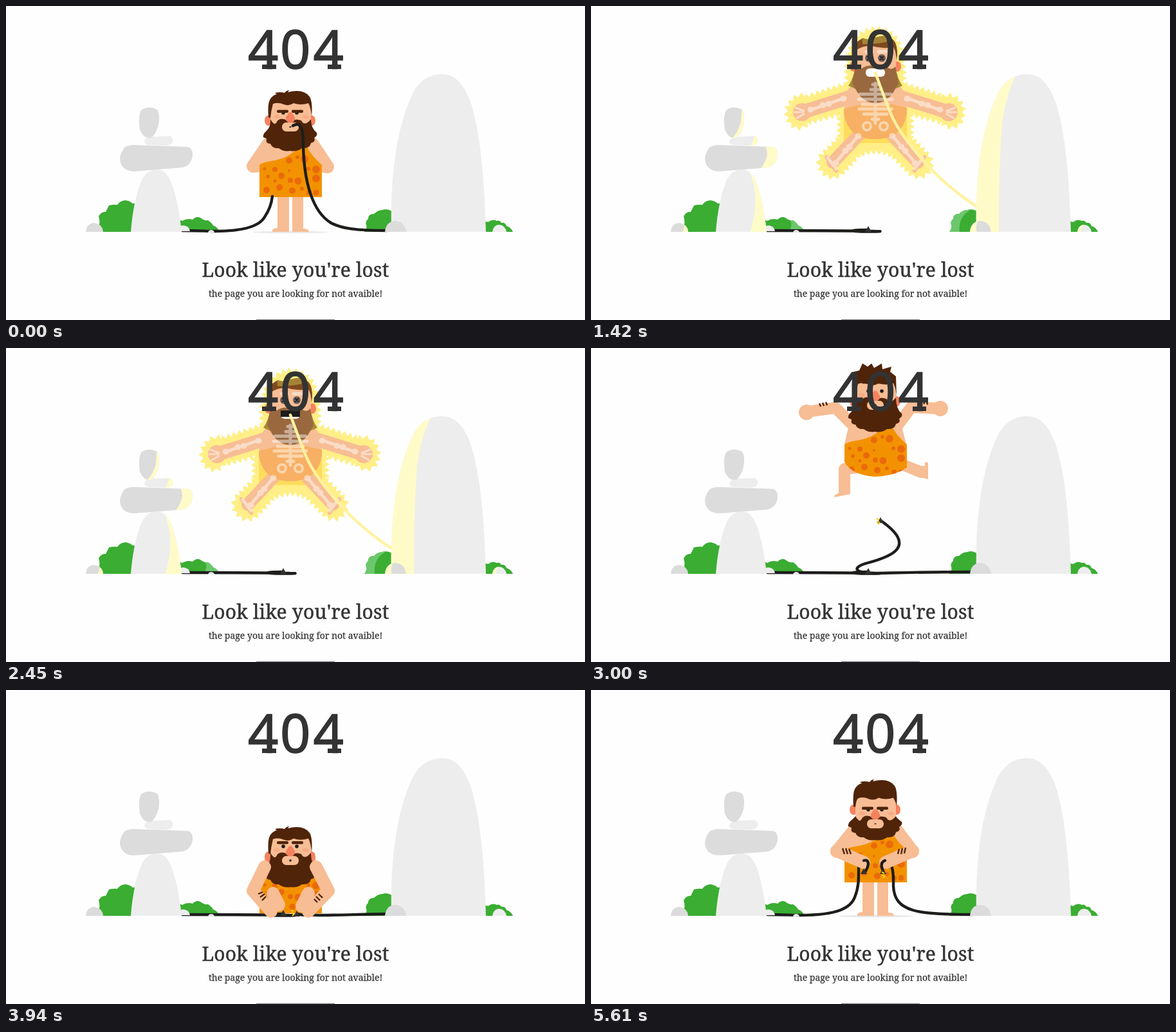
An HTML page that plays this animation: 900 by 488 pixels, repeating every 5.72 s.

```html
<!DOCTYPE html>
<html lang="en">
<head>
<meta charset="utf-8">
<title>404</title>
<style>
html, body { margin: 0; width: 100%; height: 100%; overflow: hidden; background: #fefefe; }
svg { display: block; }
text { fill: #333; stroke: #333; stroke-width: .25; font-family: "Noto Serif", serif; text-anchor: middle; }
#code { font: 500 83px "Noto Sans", sans-serif; text-anchor: start; stroke-width: 1.4; }
#title { font-size: 30px; letter-spacing: .2px; stroke-width: .5; }
.skin { fill: #f7bd94; }
.limb { fill: none; stroke: #f7bd94; stroke-width: 20; stroke-linecap: round; stroke-linejoin: round; }
.hair { fill: #4f2409; }
.fuzz { fill: none; stroke: #4f2409; stroke-width: 2.4; }
.coral { fill: #f5825f; }
.cable { fill: none; stroke: #1d1d1b; stroke-width: 4.4; stroke-linecap: round; }
.spark { fill: none; stroke: #f9d31c; stroke-width: 2; }
.bone { fill: none; stroke: #fff; stroke-width: 5; stroke-linecap: round; }
</style>
</head>
<body>
<svg width="900" height="488" viewBox="0 0 900 488">
  <defs>
    <g id="torso">
      <path class="skin" d="M404 204H479L491 250V258H394V246Z"/>
      <path fill="#f39200" d="M394 247Q398 243 412 241Q440 237 455 219H468Q474 232 491 247V297H394Z"/>
      <g id="spots" fill="#ea6a0b"></g>
    </g>
    <clipPath id="round"><path d="M380 200H510V262Q490 296 440 297Q405 294 394 274L380 272Z"/></clipPath>
    <path id="plug" d="M-5 4L0 -5L5 4Z" fill="#333"/>
    <path id="rays" class="spark" d="M-6 -3L-2 -1M-6 2H-2M-4 6L-1 3"/>
    <g id="halfShock">
      <path class="limb" style="stroke-width:22" d="M402 142L328 165"/>
      <circle class="skin" cx="328" cy="165" r="14"/>
      <path class="limb" d="M424 192L376 243"/>
      <path class="limb" style="stroke-width:6" d="M366 235L381 256"/>
      <ellipse class="coral" cx="408" cy="94" rx="6" ry="8"/>
    </g>
    <g id="halfBones">
      <path class="bone" d="M394 143L368 152M360 155L340 162M416 201L401 219M395 226L379 245M368 236L381 253"/>
      <path class="bone" style="stroke-width:9" d="M392 144h1M369 152h1M360 154h1M341 161h1M415 202h1M401 219h1M395 225h1M380 244h1"/>
      <path class="bone" style="stroke-width:3" d="M331 163L318 158M330 165H316M331 168L320 174"/>
      <circle class="bone" style="stroke-width:4" cx="429" cy="187" r="6"/>
    </g>
  </defs>

  <g id="bushes"></g>
  <ellipse id="shadow" cx="442" cy="351.5" rx="58" ry="1.8" fill="#e8e8e8"/>

  <g id="shock">
    <path id="aura" fill="#ffef86"/>
    <path fill="#fedc5c" d="M393 172H491V213H393Z"/>
    <use href="#halfShock"/><use href="#halfShock" transform="matrix(-1 0 0 1 884 0)"/>
    <path class="skin" d="M394 160Q392 128 410 122H474Q492 128 490 160Z"/>
    <path fill="#f7b064" d="M393 160Q430 150 442 148Q456 150 491 158V168Q484 207 442 207Q400 207 393 168Z"/>
    <path class="skin" d="M411 58H474V108H411Z"/>
    <path fill="#a98a35" d="M400 124Q408 113 411 94L424 112L414 130ZM484 124Q476 113 473 94L460 112L470 130Z"/>
    <path fill="#99683f" d="M411 94Q418 101 424 95Q434 90 442 95Q451 90 460 95Q467 101 473 94L478 120L470 134Q460 150 442 151Q424 150 414 134L406 120Z"/>
    <path fill="#80491f" d="M409 86Q406 62 413 56L422 50L430 52L438 45L442 49Q466 43 473 57Q478 68 475 86Q474 70 470 64Q452 67 436 62Q424 61 413 68Z"/>
    <path fill="#a48335" d="M421 50L430 52L438 45L442 49Q455 44 464 48L459 56Q440 60 422 59Z"/>
    <g opacity=".48">
      <use href="#halfBones"/><use href="#halfBones" transform="matrix(-1 0 0 1 884 0)"/>
      <path class="bone" d="M428 71H437M447 71H458M438 122H446M435 130H449M418 137H466M416 145H468M422 153H462M417 160H467M424 168H460M437 176H447M442 120V182"/>
    </g>
    <g fill="#6e5f5c"><circle cx="432" cy="81" r="6"/><circle cx="452" cy="81" r="6"/></g>
    <path stroke="#222" stroke-width="2" d="M429 78l6 6m0-6l-6 6M449 78l6 6m0-6l-6 6"/>
    <rect x="427" y="97" width="30" height="13" rx="6" fill="#fff"/>
    <rect id="jaw" x="427" y="97" width="30" height="10" fill="#1d1d1b"/>
  </g>

  <g id="stand">
    <path class="skin" d="M422 260V345Q413 345 414 351H440V260ZM445 260V351H471Q471 346 462 346V260Z"/>
    <g id="trunk">
      <path id="backArms" class="limb" d="M408 214L384 249L404 247M476 214L500 250L480 247"/>
      <path id="upperArms" class="limb" d="M408 217L382 249M476 217L500 249"/>
      <use href="#torso"/>
    </g>
  </g>

  <g id="flail">
    <g id="armL">
      <path class="limb" style="stroke-width:18" d="M408 121L380 93L337 99"/>
      <circle class="skin" cx="335" cy="100" r="12"/>
      <path class="fuzz" d="M355 86l2 5M360 85l2 5M365 84l2 5"/>
    </g>
    <g id="armR">
      <path class="limb" style="stroke-width:18" d="M476 121L498 92L541 94"/>
      <circle class="skin" cx="543" cy="94" r="12"/>
      <path class="fuzz" d="M512 82l1 5M517 82l1 5M522 83l1 5"/>
    </g>
    <path class="limb" style="stroke-width:18;stroke-linecap:butt" d="M428 184L394 188L394 227"/>
    <path class="skin" d="M386 222L403 219L403 227L378 232Q377 228 386 225Z"/>
    <path class="limb" style="stroke-width:18;stroke-linecap:butt" d="M466 174L516 194"/>
    <path class="skin" d="M511 184L519 183V178Q524 176 524 180V204L512 201Z"/>
    <g transform="translate(0 -97)" clip-path="url(#round)"><use href="#torso"/></g>
  </g>

  <g id="sit"><use href="#torso" y="50"/></g>

  <g id="head">
    <ellipse class="coral" cx="408" cy="178" rx="6" ry="8"/>
    <ellipse class="coral" cx="475" cy="178" rx="6" ry="8"/>
    <path class="skin" d="M411 143H474V200H411Z"/>
    <path id="mop" class="hair"/>
    <path id="beard" class="hair"/>
    <g id="face">
      <g fill="#f9ac86"><ellipse cx="421" cy="172" rx="5" ry="3"/><ellipse cx="466" cy="172" rx="5" ry="3"/></g>
      <g fill="#1d1d1b"><ellipse id="eyeL" cx="431" cy="166" rx="2.8"/><ellipse id="eyeR" cx="452" cy="166" rx="2.8"/></g>
      <rect id="browL" class="hair" x="421" width="18" height="4.4" rx="2"/>
      <rect id="browR" class="hair" x="444" width="18" height="4.4" rx="2"/>
      <rect class="skin" x="429" y="181" width="26" height="14" rx="6.5"/>
      <ellipse id="mouth" cx="442" cy="188" rx="1.8" fill="#1d1d1b"/>
      <path class="coral" d="M439 167Q442 163 445 167L449 173Q450 181 442 181.500Q434 181 435 173Z"/>
    </g>
  </g>

  <path id="cableL" class="cable"/>
  <path id="cableR" class="cable"/>
  <use id="plugL" href="#plug"/>
  <use id="plugR" href="#plug"/>

  <g id="hold">
    <path class="limb" d="M382 250L424 268M500 250L458 268"/>
    <path class="fuzz" d="M391 246l3 9M396 246l3 9M401 247l3 8M489 245l-2 9M484 246l-2 9M479 247l-2 8"/>
    <g id="grips">
      <path class="cable" d="M424 265Q431 263 431 271Q430 277 427 281M457 265Q448 268 454 281"/>
      <use href="#plug" x="424" y="282"/><use href="#plug" x="454" y="282"/>
    </g>
  </g>
  <g id="sitLegs">
    <path class="limb" d="M402 275L384 312L412 344M482 275L501 312L470 344"/>
    <path class="limb" d="M415 316L424 334M470 316L460 336"/>
    <path class="fuzz" d="M392 317l7 -3M395 322l7 -5M398 327l6 -6M492 323l-6 -6M488 327l-6 -6M484 330l-5 -5"/>
  </g>
  <use id="spark" href="#rays"/>
  <g id="rocks"></g>

  <text id="code" x="376 426 477.500" y="97">404</text>
  <path fill="#333" d="M398 91H420V98H398ZM500 91H521V98H500Z"/>
  <text id="title" x="450" y="421">Look like you're lost</text>
  <text x="450" y="452" font-size="14">the page you are looking for not avaible!</text>
  <path fill="#777" d="M389 487H511V488H389Z"/>
</svg>
<script>
const LOOP = 5720, JOLT = 1040, RELEASE = 2700, DROP = 3050, LAND = 3385, RISE = 4800;
const $ = id => document.getElementById(id);
const add = (parent, tag, attrs) => {
  const node = document.createElementNS('http://www.w3.org/2000/svg', tag);
  for (const k in attrs) node.setAttribute(k, attrs[k]);
  return parent.appendChild(node);
};
const set = (id, name, value) => $(id).setAttribute(name, value);
const show = (id, on) => { $(id).style.display = on ? '' : 'none'; };
const move = (id, x, y) => set(id, 'transform', `translate(${x} ${y})`);

// Scenery: a shape plus the part of it that catches the flash.
const glows = [];
function scenery(parent, fill, d, glow, tint = '#fffbc9') {
  add(parent, 'path', { d, fill });
  if (!glow) return;
  const id = 'clip' + glows.length;
  add(add(parent, 'clipPath', { id }), 'path', { d });
  glows.push(add(parent, 'path', { d: glow, fill: tint, 'clip-path': `url(#${id})` }));
}
const LEAF = '#3aad32', LIT_LEAF = '#6cc76c', PALE = '#ededed', GREY = '#dcdcdc';
const bush = (d, glow) => scenery($('bushes'), LEAF, d, glow, LIT_LEAF);
bush('M144 351V342Q147 336 144 327Q148 319 155 320Q158 314 160 310Q167 308 173 309Q178 302 186 302Q193 303 197 307Q205 306 212 312V351Z');
bush('M262 351V335Q268 331 274 334Q282 329 290 332Q296 326 302 329Q308 334 314 333Q320 337 322 341Q329 343 331 351Z', 'M298 325Q320 335 306 352H335V325Z');
bush('M557 351Q562 344 560 340Q558 335 563 331Q563 323 572 323Q578 317 585 317Q592 314 600 319V351Z', 'M555 352V315H594Q570 325 573 352Z');
bush('M744 351V334Q750 337 752 334Q758 331 763 334Q767 332 770 337Q776 336 778 342Q785 344 788 351Z');
const rock = (...args) => scenery($('rocks'), ...args);
rock(PALE, 'M267 350Q268 341 276 341Q285 342 286 350Z');
rock(PALE, 'M194 351Q198 300 212 268Q222 253 236 254Q250 255 258 277Q268 305 273 351Z', 'M243 250Q266 296 247 352H280V250Z');
rock(PALE, 'M219 205Q223 202 232 203L255 202Q261 206 259 212Q256 217 248 217L220 216Q211 212 219 205Z', 'M265 200H252Q256 207 245 220H265Z');
rock(GREY, 'M182 223Q184 217 197 216L282 219Q291 220 290 233Q288 247 275 251L200 257Q184 257 179 246Q174 236 182 223Z', 'M295 210H266Q278 224 272 238Q268 250 256 260H295Z');
rock(GREY, 'M210 162Q221 154 235 161Q240 170 237 185Q233 200 225 205Q214 207 208 192Q205 172 210 162Z', 'M245 150H235Q234 165 233 180Q228 198 218 207H245Z');
rock(GREY, 'M124 351Q125 338 137 337Q150 339 151 351Z', 'M155 335H143Q148 342 142 352H155Z');
rock(PALE, 'M599 351C597 270 606 195 629 143C640 116 658 106 678 106C700 106 712 124 721 146C740 200 744 290 746 351Z', 'M590 360V100H664Q648 130 641 170Q634 215 634 360Z');
rock(GREY, 'M589 351Q591 334 606 334Q620 336 622 351Z', 'M585 330H604Q596 340 600 352H585Z');
rock(PALE, 'M756 351Q758 340 767 340Q776 341 778 351Z', 'M750 338H768Q760 344 762 352H750Z');
rock('#e6e6e6', 'M314 352Q315 348 319 348Q323 348 324 352Z');

const spots = '402,253,2.5 418,254,4 440,240,5 453,235,3 464,238,6 428,264,5 440,256,2 418,272,2.5 442,271,4 454,272,5.5 470,253,3 482,254,6 482,268,6 405,286,5 425,282,5 445,287,5 460,284,3 471,290,4 482,290,4.5 407,265,3';
spots.split(' ').forEach(s => {
  const [cx, cy, r] = s.split(',');
  add($('spots'), 'circle', { cx, cy, r });
});

// Spiky halo made by zigzagging along a smooth outline.
const outline = add($('shock'), 'path', { fill: 'none', d: 'M443 38Q475 42 479 72Q485 95 482 123L548 144Q562 138 572 152Q580 165 570 182Q557 190 547 178L495 164V206L524 236Q530 250 518 260Q508 266 498 258L470 230Q442 216 414 230L388 258Q376 268 364 258Q352 245 360 234L389 206V164L337 178Q326 192 313 182Q302 166 312 152Q322 138 336 144L402 123Q398 95 405 72Q412 42 443 38Z' });
function halo(phase) {
  const length = outline.getTotalLength(), n = 2 * Math.round(length / 9), pts = [];
  for (let i = 0; i < n; i++) {
    const s = (i + phase) * length / n;
    const a = outline.getPointAtLength(s % length), b = outline.getPointAtLength((s + 1) % length);
    const out = i % 2 ? 8 : 1;
    pts.push((a.x + (b.y - a.y) * out).toFixed(1) + ' ' + (a.y - (b.x - a.x) * out).toFixed(1));
  }
  return 'M' + pts.join('L') + 'Z';
}
const halos = [halo(0), halo(.5)];

// Cables: three joined curves, ending at the plug.
const left = {
  stand: [274,349, 300,349,312,350,325,350, 370,350,394,342,402,328, 410,316,413,305,414,296],
  up: [274,349, 330,349,400,349,441,350, 474,350,400,352,405,346, 407,340,420,338,431,328],
  flat: [274,349, 330,349,400,349,441,350, 474,350,400,352,408,349, 415,348,425,348,431,348],
  hold: [274,349, 300,349,312,350,325,350, 385,350,404,338,410,322, 417,305,416,290,416,272]
};
const right = {
  stand: [592,349, 545,349,522,346,505,337, 477,320,463,275,462,215, 462,190,458,179,446,186],
  taut: [602,313, 580,300,550,275,535,260, 500,225,475,190,465,165, 455,140,448,120,442,104],
  whip: [592,348, 500,348,460,350,440,350, 410,350,404,341,430,334, 468,324,508,308,450,268],
  flat: [592,348, 540,349,510,350,490,350, 480,350,475,349,470,350, 460,350,456,349,452,348],
  hold: [592,349, 540,349,515,347,500,342, 480,336,471,325,470,305, 470,295,471,285,467,273]
};
const leftKeys = [[0, left.stand], [JOLT, left.stand], [1200, left.flat], [1550, left.flat], [1860, left.up], [2250, left.flat], [4720, left.flat], [4880, left.hold]];
const rightKeys = [[0, right.stand], [JOLT, right.stand], [1180, right.taut], [RELEASE, right.taut], [3000, right.whip], [3480, right.flat], [4720, right.flat], [4880, right.hold]];
const bodyKeys = [[RISE, 45], [4930, -20], [5080, 9], [5200, 2]];

function at(keys, t) {
  const i = keys.findIndex(k => k[0] > t);
  if (i === 0) return keys[0][1];
  if (i < 0) return keys[keys.length - 1][1];
  const [t0, a] = keys[i - 1], [t1, b] = keys[i];
  const u = (t - t0) / (t1 - t0), e = u * u * (3 - 2 * u);
  const mix = (p, q) => p + (q - p) * e;
  return Array.isArray(a) ? a.map((p, j) => mix(p, b[j])) : mix(a, b);
}
const curve = p => `M${p.slice(0, 2)}C${p.slice(2)}`;

function drawHead({ x = 0, y = 0, look = 0, browL = 0, browR = 0, eye = 2.8, mouth = 1.8, wild = false, turn = 0 }) {
  const f = look, fringe = f > 0 ? f * .7 : f * .3;
  set('head', 'transform', `translate(${x} ${y}) rotate(${turn} 442 200)`);
  move('face', 0, f);
  const crown = wild
    ? 'L410 140L408 132L417 130L422 119L430 124L436 119L440 126L452 119L453 128L467 124L465 132L474 139L475 172'
    : 'Q406 149 412 143Q416 138 421 137L418 135Q426 133 433 135Q436 131 440 131L438 134Q462 128 472 141Q477 150 475 172';
  set('mop', 'd', `M408 173${crown}Q474 ${158 + fringe} 470 ${151 + fringe}Q458 ${155 + fringe} 447 ${151 + fringe}Q440 ${156 + fringe} 432 ${153 + fringe}Q423 ${149 + fringe} 415 ${152 + fringe}Q412 163 411 174Z`);
  set('beard', 'd', `M411 ${176 + f}Q418 ${188 + f} 421 ${180 + f}Q424 ${174 + f} 433 ${176 + f}Q440 ${180 + f} 443 ${180 + f}Q450 ${174 + f} 459 ${178 + f}Q464 ${188 + f} 474 ${176 + f}Q474 190 483 197Q485 201 479 205Q482 211 474 213Q472 222 460 221Q452 227 441 225Q432 227 424 221Q414 222 411 214Q403 214 405 206L400 204Q399 199 404 195Q412 188 411 ${176 + f}Z`);
  set('browL', 'y', 158 + browL);
  set('browR', 'y', 158 + browR);
  set('eyeL', 'ry', eye);
  set('eyeR', 'ry', eye);
  set('mouth', 'ry', mouth);
}

function render(t) {
  const chew = t < JOLT, shock = !chew && t < RELEASE, flail = t >= RELEASE && t < LAND;
  const sit = t >= LAND && t < RISE, hold = t >= RISE, beat = Math.floor(t / 62);
  show('shock', shock);
  show('stand', chew || hold);
  show('shadow', chew || hold);
  show('backArms', chew);
  show('upperArms', hold);
  show('hold', hold);
  show('flail', flail);
  show('sit', sit);
  show('sitLegs', sit);
  show('head', !shock);
  const lit = shock && beat % 5 !== 3;
  glows.forEach(g => { g.style.display = lit ? '' : 'none'; });

  const pl = at(leftKeys, t).slice(), pr = at(rightKeys, t).slice();
  let sparkAt = null;

  if (chew) {
    const pull = t >= 30 && t < 820 ? Math.sin((t - 30) / 790 * Math.PI * 8) : 0;
    move('trunk', 0, 0);
    drawHead({ turn: pull * .8, browL: 3.5, browR: at([[560, 3.5], [780, -2]], t), mouth: 1 });
    const tug = at([[600, 0], [800, -2.5]], t);
    for (let i = 13; i < 20; i += 2) pr[i] += tug + pull;
    for (let i = 6; i < 11; i += 2) pr[i] += pull * 2;
  }
  if (shock) {
    const u = Math.min(1, (t - JOLT) / 150);
    move('shock', 0, 86 * (1 - u) * (1 - u));
    set('aura', 'd', halos[beat % 2]);
    show('jaw', beat % 2);
  }
  if (flail) {
    const fall = t < DROP ? 0 : 176 * ((t - DROP) / (LAND - DROP)) ** 2;
    const wave = 5 * Math.sin((t - 3000) / 70);
    move('flail', 0, fall);
    set('armL', 'transform', `rotate(${wave} 405 118)`);
    set('armR', 'transform', `rotate(${-wave} 478 118)`);
    drawHead({ y: fall - 95, look: -4, browL: -8, browR: -8, wild: true });
    sparkAt = [pr[18], pr[19]];
  }
  if (sit) {
    const u = t - LAND;
    const bounce = 10 * Math.exp(-u / 110) * Math.sin(u / 45) + at([[4710, 0], [RISE, 6]], t);
    const blink = (t > 4060 && t < 4160) || (t > 4300 && t < 4390);
    const brow = at([[3950, 0], [4080, -3], [4320, -3], [4470, 0]], t);
    move('sit', 0, bounce);
    drawHead({ y: 81 + bounce, look: -4, eye: blink ? .5 : 2.8, wild: u < 120, browL: brow, browR: brow });
    sparkAt = [449, 345];
  }
  if (hold) {
    const d = at(bodyKeys, t), lift = d - 2;
    const brow = at([[4950, 0], [5230, 3.5]], t);
    move('trunk', 0, d);
    move('hold', 0, lift);
    move('grips', t > 5310 && t < 5610 ? .8 * Math.sin(t / 40) : 0, 0);
    drawHead({ y: d + 6, look: at([[4950, -4], [5230, 12]], t), browL: brow, browR: brow, mouth: .8 });
    for (const i of [17, 19]) { pl[i] += lift; pr[i] += lift; }
    sparkAt = [458, 286 + lift];
  }

  set('cableL', 'd', curve(pl));
  set('cableR', 'd', curve(pr));
  $('cableR').style.stroke = shock ? '#fff2a0' : '';
  show('plugL', !chew && !hold);
  show('plugR', flail || sit);
  move('plugL', pl[18], pl[19] - 1);
  move('plugR', pr[18], pr[19]);
  show('spark', sparkAt && Math.floor(t / 60) % 3 !== 1);
  if (sparkAt) move('spark', ...sparkAt);
}

function frame() {
  render(performance.now() % LOOP);
  requestAnimationFrame(frame);
}
frame();
</script>
</body>
</html>
```
